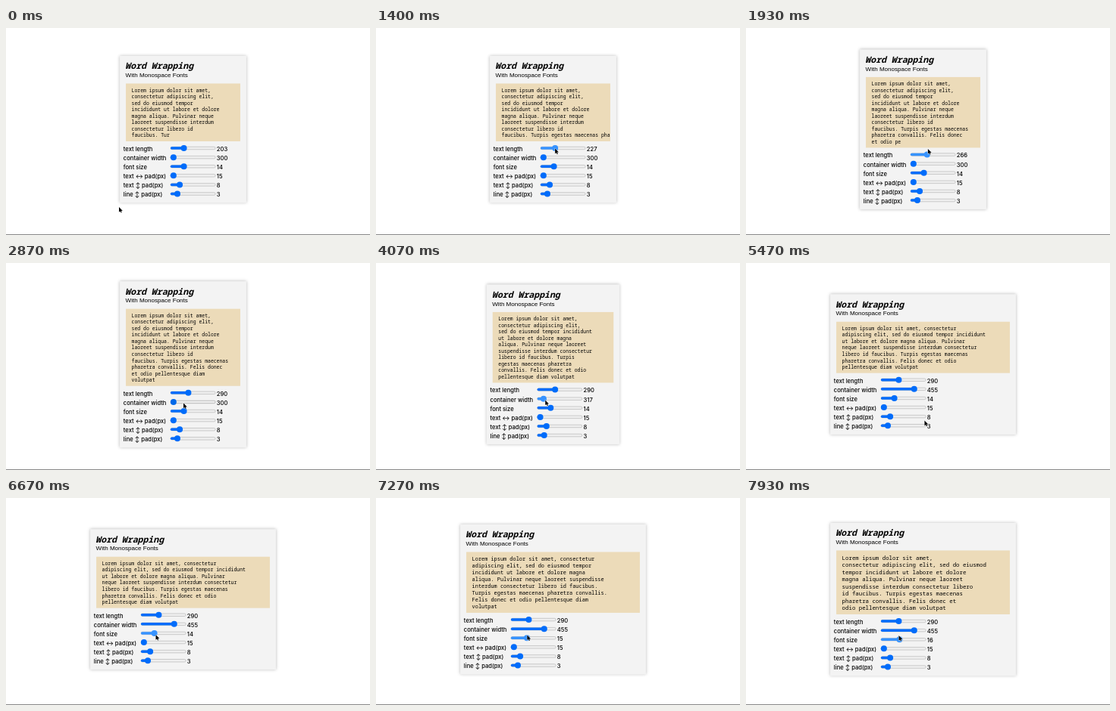
Animation, 480 px wide and 274 px high, one loop 8 s. Source, as an HTML page with a canvas:

```html
<!DOCTYPE html>
<html lang="en">
<head>
<meta charset="utf-8">
<title>Word Wrapping</title>
<style>
  html, body { margin: 0; width: 100%; height: 100%; overflow: hidden; background: #fff; }
  canvas { display: block; width: 480px; height: 274px; }
</style>
</head>
<body>
<canvas id="stage"></canvas>
<script>
const LOOP = 8000, FPS = 15;
const SCALE = 0.503;            // stage pixels per page pixel
const CENTER_X = 233.5, CENTER_Y = 134.2;
const HEADER = 36.5, CONTROLS = 81.5, MARGIN = 8, ROW = 12.1;
const TRACK = 59.5, THUMB = 4;
const PAD_X = 15, PAD_Y = 8, LINE_PAD = 3;
const MONO = '"Noto Sans Mono", monospace';
const LABEL = '500 7.6px Inter, sans-serif';
const TEXT = 'Lorem ipsum dolor sit amet, consectetur adipiscing elit, sed do eiusmod tempor ' +
  'incididunt ut labore et dolore magna aliqua. Pulvinar neque laoreet suspendisse interdum ' +
  'consectetur libero id faucibus. Turpis egestas maecenas pharetra convallis. ' +
  'Felis donec et odio pellentesque diam volutpat';

// Each drag holds one slider and takes its value from a to b.
const DRAGS = [
  { row: 0, grab: 1050, release: 2450, start: 1066, end: 2266, a: 203, b: 290, power: 1 },
  { row: 1, grab: 3860, release: 4870, start: 4000, end: 4333, a: 300, b: 455, power: 1.35 },
  { row: 2, grab: 6650, release: LOOP, start: 6666, end: 7860, a: 14, b: 16, power: 1 }
];
// Pointer moves: start, end, x, y
const HOME = [149, 237];
const MOVES = [
  [0, 130, 205, 189],
  [430, 930, 235, 159.5],
  [1066, 2266, 241, 160],
  [2470, 2866, 234, 185.5],
  [2930, 3670, 223, 181.5],
  [4000, 4330, 225, 182],
  [4870, 5250, 236, 209],
  [5400, 6330, 197.5, 181],
  [6666, 7930, 201.5, 182]
];

const canvas = document.getElementById('stage');
const ctx = canvas.getContext('2d');
const ratio = window.devicePixelRatio || 1;
canvas.width = 480 * ratio;
canvas.height = 274 * ratio;

const progress = (t, start, end) => Math.min(1, Math.max(0, (t - start) / (end - start)));
const mix = (a, b, k) => a + (b - a) * k;
const smooth = k => k * k * (3 - 2 * k);

function dragValue({ start, end, a, b, power }, t) {
  return Math.floor(mix(a, b, progress(t, start, end) ** power) + 0.3);
}

function pointerAt(t) {
  return MOVES.reduce(([x, y], [start, end, toX, toY]) => {
    const k = smooth(progress(t, start, end));
    return [mix(x, toX, k), mix(y, toY, k)];
  }, HOME);
}

// Breaks at the last word start before each multiple of perLine.
function wrap(text, perLine) {
  const lines = [];
  for (let start = 0, end = perLine; start < text.length; end += perLine) {
    const stop = end >= text.length ? text.length
      : text.lastIndexOf(' ', Math.floor(end) - 1) + 1;
    lines.push(text.slice(start, stop));
    start = stop;
  }
  return lines;
}

function write(text, x, y, font) {
  ctx.font = font;
  ctx.fillStyle = '#000';
  ctx.fillText(text, x, y);
}

function bar(x, y, w, fill, stroke) {
  ctx.beginPath();
  ctx.roundRect(x, y - 1.75, w, 3.5, 1.75);
  ctx.fillStyle = fill;
  ctx.fill();
  if (!stroke) return;
  ctx.strokeStyle = stroke;
  ctx.lineWidth = 0.5;
  ctx.stroke();
}

function slider(x, y, share, color, border) {
  const thumb = x + THUMB + share * (TRACK - 2 * THUMB);
  bar(x + 0.25, y, TRACK - 0.5, '#efefef', border);
  bar(x, y, thumb - x, color);
  ctx.beginPath();
  ctx.arc(thumb, y, THUMB, 0, 7);
  ctx.fill();
}

const arrow = new Path2D('M0 0V6.8L1.6 5.4L2.6 7.6L3.7 7.1L2.7 5H4.8Z');

function drawPointer(x, y) {
  ctx.save();
  ctx.translate(x, y);
  ctx.strokeStyle = '#fff';
  ctx.lineWidth = 0.8;
  ctx.stroke(arrow);
  ctx.fillStyle = '#000';
  ctx.fill(arrow);
  ctx.restore();
}

function draw(t) {
  const [length, width, size] = DRAGS.map(drag => dragValue(drag, t));
  const [px, py] = pointerAt(t);
  const held = DRAGS.find(({ grab, release }) => t >= grab && t < release);

  const lines = wrap(TEXT.slice(0, length), (width - 43) / (size - 5));
  const em = size * SCALE, pitch = em + LINE_PAD * SCALE;
  const boxW = width * SCALE, boxH = lines.length * pitch + 2 * PAD_Y * SCALE;
  const cardH = HEADER + boxH + CONTROLS;
  const left = CENTER_X - boxW / 2, top = CENTER_Y - cardH / 2;
  const boxTop = top + HEADER, boxBottom = boxTop + boxH;

  ctx.setTransform(ratio, 0, 0, ratio, 0, 0);
  ctx.fillStyle = '#fff';
  ctx.fillRect(0, 0, 480, 274);
  ctx.fillStyle = '#888';
  ctx.fillRect(0, 273, 480, 1);

  ctx.shadowColor = 'rgba(0,0,0,.28)';
  ctx.shadowBlur = 4 * ratio;
  ctx.fillStyle = '#f3f3f3';
  ctx.fillRect(left - MARGIN, top, boxW + 2 * MARGIN, cardH);
  ctx.shadowColor = 'transparent';

  write('Word Wrapping', left - 0.7, top + 17.5, `italic 800 11.5px ${MONO}`);
  write('With Monospace Fonts', left - 0.5, top + 28.2, '8.05px "Liberation Sans", sans-serif');

  ctx.fillStyle = '#ecdbb9';
  ctx.fillRect(left, boxTop, boxW, boxH);
  lines.forEach((line, i) => write(line, left + PAD_X * SCALE,
    boxTop + PAD_Y * SCALE + em + i * pitch, `500 ${em * 0.917}px ${MONO}`));

  const rows = [
    ['text length', length, 0, 763],
    ['container width', width, 300, 500],
    ['font size', size, 10, 25],
    ['text ↔ pad(px)', PAD_X, 15, 50],
    ['text ↕ pad(px)', PAD_Y, 0, 50],
    ['line ↕ pad(px)', LINE_PAD, 0, 30]
  ];
  rows.forEach(([label, value, min, max], i) => {
    const x = left + 58.8, y = boxBottom + 9.1 + i * ROW;
    const hover = !held && Math.abs(py - y) < THUMB && px > x && px < x + TRACK;
    const color = held && held.row === i ? '#3793ff' : hover ? '#0068e8' : '#006cfa';
    write(label, left - 3.2, y + 3.9, LABEL);
    slider(x, y, (value - min) / (max - min), color, hover ? '#808080' : '#a0a0a0');
    write(value, left + 119.8, y + 3.9, LABEL);
  });

  drawPointer(px, py);
}

function tick() {
  const t = performance.now() % LOOP;
  draw(Math.floor(t * FPS / 1000 + 0.1) * 1000 / FPS);
  requestAnimationFrame(tick);
}
tick();
</script>
</body>
</html>
```
